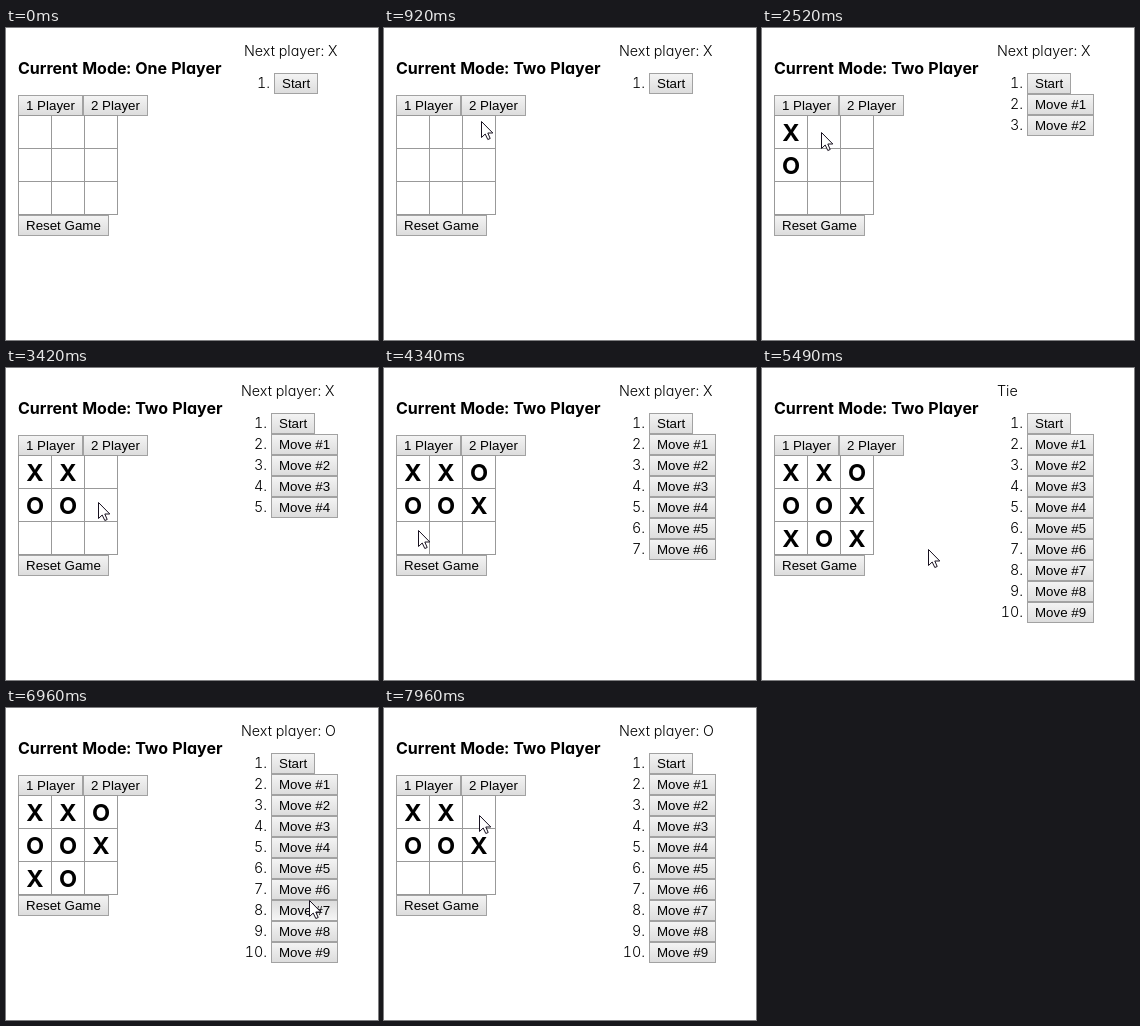
Animation of 372x312 px, one loop 8 s. Source, as an HTML page:

```html
<!DOCTYPE html>
<html lang="en">
<head>
<meta charset="utf-8">
<title>Tic-tac-toe</title>
<style>
  html, body { margin: 0; width: 100%; height: 100%; overflow: hidden; background: #fff; }
  svg { display: block; }
  text { font: 300 14.3px Inter, Lato, sans-serif; font-feature-settings: "cv11", "tnum"; fill: #000; white-space: pre; }
  .mode { font-weight: 700; font-size: 16px; }
  .mark { font-weight: 700; font-size: 23.5px; text-anchor: middle; }
  .number { text-anchor: end; }
  .button text { font: 13.333px "Liberation Sans", Arial, sans-serif; }
  .button rect { fill: url(#face); stroke: #a2a2a2; }
  .button.hover rect { fill: url(#lit); }
  .button.pressed rect { fill: url(#sunk); }
  .cell { fill: #fff; stroke: #999; }
  .cursor { fill: #fff; stroke: #17101f; }
</style>
</head>
<body>
<svg id="stage" width="372" height="312" viewBox="0 0 372 312">
  <defs>
    <linearGradient id="face" x2="0" y2="1">
      <stop stop-color="#f4f4f4"/><stop offset="1" stop-color="#dcdcdc"/>
    </linearGradient>
    <linearGradient id="lit" x2="0" y2="1">
      <stop stop-color="#f8f8f8"/><stop offset="1" stop-color="#e2e2e2"/>
    </linearGradient>
    <linearGradient id="sunk" x2="0" y2="1">
      <stop stop-color="#dcdcdc"/><stop offset="1" stop-color="#f6f6f6"/>
    </linearGradient>
  </defs>
</svg>
<script>
const LOOP = 8000;
const CURSOR_IN = 30, MODE_CLICK = 560, PRESS = 100;
const CELL = 33, ROW = 21;

const cellX = i => 12.5 + i % 3 * CELL;
const cellY = i => 87.5 + Math.floor(i / 3) * CELL;
const rowY = i => 45 + i * ROW;

// Cells in playing order, X first, clicked at a steady pace.
const moves = [0, 3, 1, 4, 5, 2, 6, 7, 8].map((cell, i) => ({
  cell, time: 1690 + i * 455, x: cellX(cell) + 16.5, y: cellY(cell) + 13.5
}));
// Then the history is stepped back from move 9 to move 5.
const jumps = Array.from({ length: 5 }, (_, i) => ({
  step: 9 - i, time: 6320 + i * 330, x: 303, y: rowY(9 - i)
}));

const path = [
  { time: CURSOR_IN, x: 160, y: 257 },
  { time: MODE_CLICK, x: 106, y: 77 },
  { time: 920, x: 97, y: 93 },
  ...moves,
  { time: 5490, x: 166, y: 181 },
  ...jumps,
  { time: 7960, x: 95, y: 107 }
];
const clicks = [MODE_CLICK, ...jumps.map(jump => jump.time)];

const stage = document.getElementById("stage");

function add(tag, attrs, parent = stage) {
  const node = document.createElementNS(stage.namespaceURI, tag);
  for (const name in attrs) node.setAttribute(name, attrs[name]);
  return parent.appendChild(node);
}

function addText(x, y, text, cls, parent) {
  const node = add("text", { x, y, class: cls }, parent);
  node.textContent = text;
  return node;
}

const buttons = [];
function addButton(x, y, width, label, parent) {
  const node = add("g", { class: "button" }, parent);
  add("rect", { x: x + .5, y: y + .5, width: width - 1, height: ROW - 1 }, node);
  addText(x + 8, y + 15, label, "", node);
  buttons.push({ node, x, y, width });
}

const mode = addText(12, 46, "", "mode");
addButton(12, 67, 65, "1 Player");
addButton(77, 67, 65, "2 Player");

const marks = Array.from({ length: 9 }, (_, i) => {
  const x = cellX(i), y = cellY(i);
  add("rect", { x, y, width: CELL, height: CELL, class: "cell" });
  return addText(x + 16.5, y + 25.5, "", "mark");
});
addButton(12, 187, 91, "Reset Game");

const info = add("g", {});
const status = addText(235, 28, "", "", info);
const history = Array.from({ length: 10 }, (_, i) => {
  const item = add("g", {}, info), y = rowY(i);
  addText(261, y + 15, `${i + 1}.`, "number", item);
  addButton(265, y, i ? 67 : 44, i ? `Move #${i}` : "Start", item);
  return item;
});

const cursor = add("path", {
  class: "cursor",
  d: "M.5 .5V16.5L4.2 13L6.8 18.5L9.2 17.5L6.8 12H11.8Z"
});

function cursorAt(t) {
  const i = path.findIndex(stop => stop.time > t);
  const to = path.at(i), from = path[i - 1] || to;
  const p = i > 0 ? (t - from.time) / (to.time - from.time) : 1;
  const ease = p * p * (3 - 2 * p);
  const mix = (a, b) => Math.round(a + (b - a) * ease);
  return [mix(from.x, to.x), mix(from.y, to.y)];
}

function show(node, visible) {
  node.setAttribute("visibility", visible ? "visible" : "hidden");
}

function render(t) {
  const twoPlayers = t >= MODE_CLICK;
  const played = moves.filter(move => t >= move.time).length;
  const jump = jumps.filter(({ time }) => t >= time).pop();
  const step = jump ? jump.step : played;

  mode.textContent = `Current Mode: ${twoPlayers ? "Two" : "One"} Player`;
  info.setAttribute("transform", `translate(${twoPlayers ? 0 : 3} 0)`);
  // Jumping back does not change whose turn it is.
  status.textContent = step === 9 ? "Tie" : `Next player: ${played % 2 ? "O" : "X"}`;
  moves.forEach(({ cell }, i) => {
    marks[cell].textContent = i < step ? "XO"[i % 2] : "";
  });
  history.forEach((item, i) => show(item, i <= played));

  const [x, y] = cursorAt(t), inside = t >= CURSOR_IN;
  const pressing = clicks.some(time => t < time && t >= time - PRESS);
  show(cursor, inside);
  cursor.setAttribute("transform", `translate(${x} ${y})`);
  for (const b of buttons) {
    const over = inside && x >= b.x && x < b.x + b.width && y >= b.y && y < b.y + ROW;
    b.node.classList.toggle("hover", over);
    b.node.classList.toggle("pressed", over && pressing);
  }
}

const start = performance.now();
function tick() {
  render((performance.now() - start) % LOOP);
  requestAnimationFrame(tick);
}
tick();
</script>
</body>
</html>
```
